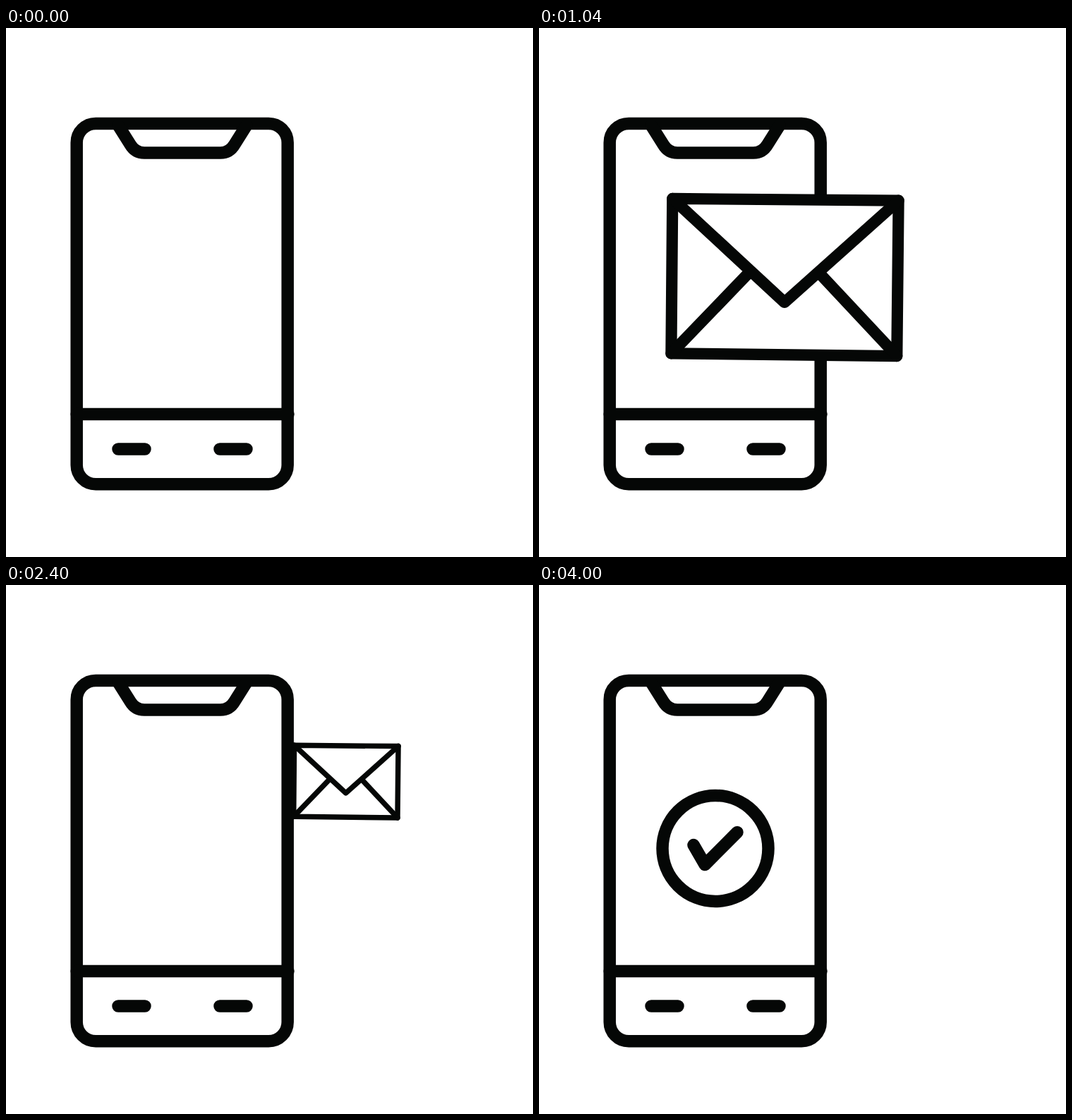
An HTML page for the animation above (5000 ms loop, 747 px wide and 750 px high).

```html
<!DOCTYPE html>
<html lang="en">
<head>
<meta charset="utf-8">
<title>Message sent</title>
<style>
  html, body { margin: 0; width: 100%; height: 100%; overflow: hidden; background: #fff; }
  svg { display: block; width: 100%; height: 100%; }
  .ink { fill: none; stroke: #050706; stroke-width: 17.5; stroke-linecap: round; stroke-linejoin: round; }
</style>
</head>
<body>
<svg viewBox="0 0 747 750" class="ink">
  <g id="phone">
    <rect x="100.2" y="135.4" width="299" height="511.4" rx="27"/>
    <path d="M159 138L176 165Q183 177 196 177H304Q317 177 324 165L341 138"/>
    <path d="M100.2 547.5H400M159 597H197M303 597H341"/>
  </g>
  <g id="mail">
    <path d="M176.5 233L522.5 236L520 474L174.5 470Z" fill="#fff"/>
    <path d="M176.5 233L348 391.8L522.5 236M174.5 470L293 347M520 474L403 349"/>
  </g>
  <g id="waves">
    <path d="M533.5 190A23 23 0 0 1 556.5 213"/>
    <path d="M534 145A67.5 67.5 0 0 1 601.5 212.5"/>
    <path d="M534 100.5A112.5 112.5 0 0 1 646.5 213"/>
  </g>
  <path id="ring" d="M250 448.5A75 75 0 0 1 250 298.5A75 75 0 0 1 250 448.5"/>
  <path id="tick" d="M219 368.5L235.2 396.5L281 350.5"/>
</svg>
<script>
const LOOP = 5000, STEP = 40;
const get = id => document.getElementById(id);
const phone = get('phone'), mail = get('mail'), ring = get('ring'), tick = get('tick');
const waves = [...get('waves').children];

const part = (t, a, b) => Math.min(1, Math.max(0, (t - a) / (b - a)));
const mix = (a, b, u) => a + (b - a) * u;
const linear = u => u;
const smooth = u => u * u * (3 - 2 * u);
const cubic = u => u < 0.5 ? 4 * u ** 3 : 1 - 4 * (1 - u) ** 3;

// keys: [time, value] pairs in order
function track(t, keys, ease) {
  let value = keys[0][1];
  for (let i = 1; i < keys.length; i++) {
    value = mix(value, keys[i][1], ease(part(t, keys[i - 1][0], keys[i][0])));
  }
  return value;
}

const hop = [[0, 0], [120, 16], [360, -41], [560, 13], [760, 0]];
const tilt = [[0, 0], [240, 3.05], [360, 4.25], [560, 0]];
// on start, on end, off start, off end
const waveTimes = [[1140, 1380, 2120, 2240], [1400, 1540, 2020, 2120], [1540, 1680, 1840, 1980]];

function trim(path, amount) {
  const length = path.getTotalLength();
  path.style.display = amount > 0 ? '' : 'none';
  path.style.strokeDasharray = amount < 1 ? `${length * amount} ${length * 2}` : 'none';
}

function drawMail(t) {
  const grow = smooth(part(t, 740, 1100));
  const shrink = smooth(part(t, 1540, 2000));
  const fly = cubic(part(t, 2080, 2760));
  const x = mix(mix(348.5, 361, shrink), 651, fly);
  const y = mix(mix(353.5, 322, shrink), 218, fly);
  const size = grow * mix(mix(1, 0.731, shrink), 0, fly);
  mail.style.display = size > 0 ? '' : 'none';
  mail.setAttribute('transform', `translate(${x} ${y}) scale(${size}) translate(-348.5 -353.5)`);
}

function draw(t) {
  phone.setAttribute('transform',
    `translate(0 ${track(t, hop, smooth)}) rotate(${track(t, tilt, linear)} 249.5 626)`);
  drawMail(t);
  waves.forEach((wave, i) => {
    const [a, b, c, d] = waveTimes[i];
    trim(wave, part(t, a, b) - part(t, c, d));
  });
  trim(ring, part(t, 3160, 3560));
  trim(tick, part(t, 3560, 4000));
}

const start = performance.now();
function frame() {
  const t = (performance.now() - start) % LOOP;
  draw(Math.floor(t / STEP) * STEP);
  requestAnimationFrame(frame);
}
frame();
</script>
</body>
</html>
```
